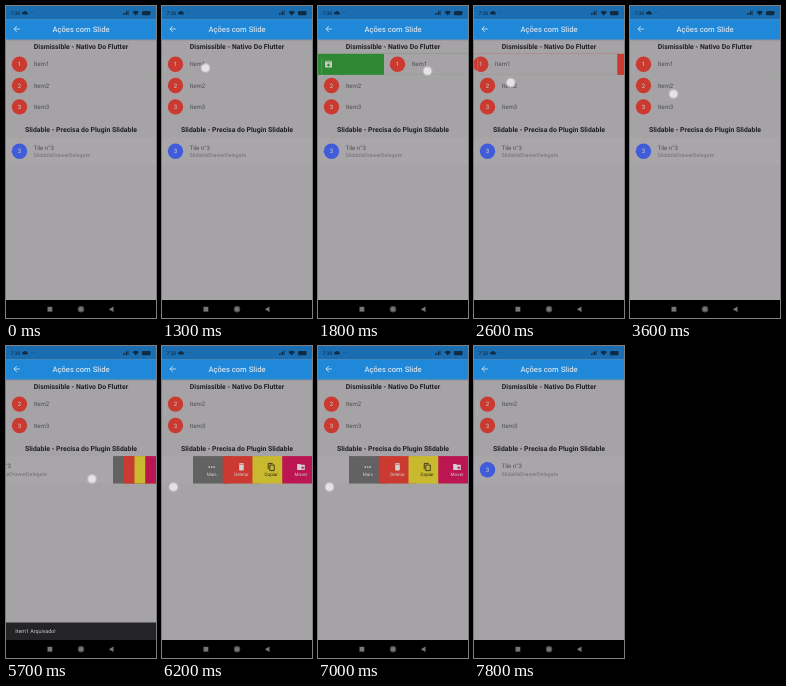
An HTML page for the animation above (8000 ms loop, 150 px wide and 312 px high).

```html
<!DOCTYPE html>
<html lang="pt">
<head>
<meta charset="utf-8">
<style>
  html, body { margin: 0; width: 100%; height: 100%; overflow: hidden; background: #a5a3a5; }
  svg { display: block; width: 100vw; height: 100vh; }
  text { font-family: Roboto, "Open Sans", sans-serif; text-rendering: geometricPrecision; }
  .mid { text-anchor: middle; }
  .heading { font-size: 6.9px; font-weight: 700; fill: #202022; }
  .title { font-size: 6.1px; fill: #505052; }
  .subtitle { font-size: 5.35px; fill: #727173; }
  .number { font-size: 6px; fill: #d5cdd0; }
  .label { font-size: 4.6px; }
</style>
</head>
<body>
<svg id="stage" viewBox="0 0 150 312"></svg>
<script>
const LOOP = 8000, STEP = 100, ROW = 21.4, ACTION = 37.5, SNACK = 17.5;
const RED = '#cb3a30', LIGHT = '#d2d0d2';

const text = (x, y, cls, s, extra = '') => `<text x="${x}" y="${y}" class="${cls}" ${extra}>${s}</text>`;
const rect = (x, y, w, h, fill, extra = '') =>
  `<rect x="${x}" y="${y}" width="${w}" height="${h}" fill="${fill}" ${extra}/>`;
const path = (d, fill, extra = '') => `<path d="${d}" fill="${fill}" ${extra}/>`;
const avatar = (y, color, n) =>
  `<circle cx="13.5" cy="${y}" r="7.7" fill="${color}"/>` + text(13.5, y + 2.1, 'number mid', n);
const item = (n, y) => avatar(y, RED, n) + text(27.5, y + 2.2, 'title', 'Item' + n);

// Icons are drawn around their own centre.
const icons = {
  more: c => [-2.5, 0, 2.5].map(x => `<circle cx="${x}" r=".85" fill="${c}"/>`).join(''),
  trash: c => path('M-2.7-3.4h1.4l.5-.6h1.6l.5.6h1.4v.8h-5.4zM-2.3-2.1h4.6v4.9q0 .8-.8.8h-3q-.8 0-.8-.8z', c),
  copy: c => path('M-3 2.2v-5.8h4.4M-1.4-2h4.4v5.6h-4.4z', 'none', `stroke="${c}" stroke-width=".85"`),
  folder: c => path('M-3.8-3h3l.8.8h3.8v5.2h-7.6z', c) + path('M.2.2h1.3v-1.2l1.8 1.7-1.8 1.7v-1.2h-1.3z', '#bb1552'),
  archive: c => path('M-3.4-2.4l.8-1h5.2l.8 1v5.8h-6.8z', c) + path('M-2.4-2.4h4.8M0-.9v2M-1.4.6h2.8l-1.4 1.6z', '#2f8934', 'stroke="#2f8934" stroke-width=".7"')
};
const icon = (name, x, y, color = LIGHT) => `<g transform="translate(${x} ${y})">${icons[name](color)}</g>`;

const actions = [
  ['Mais', '#636263', 'more', LIGHT],
  ['Deletar', RED, 'trash', LIGHT],
  ['Copiar', '#c9b92f', 'copy', '#2a2818'],
  ['Mover', '#bb1552', 'folder', LIGHT]
].map(([label, color, name, ink]) => `<g class="action">${rect(0, 131.5, ACTION, 27.4, color)}
  ${icon(name, ACTION / 2, 142.4, ink)}${text(ACTION / 2, 151.3, 'label mid', label, `fill="${ink}"`)}</g>`).join('');

const statusBar = rect(0, 0, 150, 13.5, '#1a6db0') +
  text(4.5, 8.8, '', '7:38', 'font-size="5" fill="#102c45"') +
  path('M17 8.5a1.4 1.4 0 0 1 .5-2.7 2 2 0 0 1 3.6.6 1.1 1.1 0 0 1 .1 2.1z', '#102c45') +
  text(25, 8.2, '', '···', 'font-size="5" fill="#102c45"') +
  path('M117 9h1v-1.5h-1zM118.5 9h1v-2.5h-1zM120 9h1v-3.5h-1zM121.5 9h1v-4.5h-1zM126.5 6q3.2-2.5 6.4 0l-3.2 3.4z', '#102c45') +
  rect(136, 5, 8.5, 4.2, '#102c45', 'rx="1"');

const appBar = rect(0, 13.5, 150, 20, '#2088d9') + rect(0, 33.5, 150, 1, '#000', 'opacity=".13"') +
  path('M13.8 23H8M10.8 20.1L7.9 23l2.9 2.9', 'none', 'stroke="#cfdfec" stroke-width=".9"') +
  text(75, 25.8, 'mid', 'Ações com Slide', 'font-size="7.64" font-weight="500" fill="#cfdfec"');

const navBar = rect(0, 294, 150, 18, '#000') + rect(41.5, 300.8, 4.8, 4.8, '#77777a') +
  '<circle cx="75" cy="303.2" r="2.9" fill="#77777a" stroke="#77777a" stroke-width=".6"/>' +
  '<circle cx="75" cy="303.2" r="2.6" fill="none" stroke="#222" stroke-width=".5"/>' +
  path('M107.5 300.4v5.6l-4.6-2.8z', '#77777a');

const stage = document.getElementById('stage');
stage.innerHTML = `
  ${rect(0, 0, 150, 312, '#a5a3a5')}
  ${text(75, 42.6, 'heading mid', 'Dismissible - Nativo Do Flutter')}
  <clipPath id="rowClip"><rect id="rowBox" y="47.5" width="150" height="${ROW}"/></clipPath>
  <g clip-path="url(#rowClip)">
    <g id="archiveBg">${rect(0, 47.5, 150, ROW, '#2f8934')}${icon('archive', 10.5, 58.2)}</g>
    <g id="deleteBg">${rect(0, 47.5, 150, ROW, RED)}${icon('trash', 139.5, 58.2)}</g>
    <g id="firstItem">${rect(0, 47.5, 150, ROW, '#a5a3a5')}${item(1, 58.2)}</g>
  </g>
  <g id="below">
    ${item(2, 79.5)}${item(3, 100.9)}
    ${text(75, 126.2, 'heading mid', 'Slidable - Precisa do Plugin Slidable')}
    ${actions}
    <g id="tile">${rect(0, 131.5, 150, 27.4, '#a8a6a8')}${avatar(145.2, '#415cdb', 3)}
      ${text(27.5, 143.5, 'title', 'Tile n°3')}${text(27.5, 151.3, 'subtitle', 'SlidableDrawerDelegate')}</g>
  </g>
  ${rect(3.4, 52, .8, 18, '#c4c2c4', 'opacity=".35"')}
  <g id="snack">${rect(0, 0, 150, SNACK, '#242325')}
    ${text(9.2, 10.7, '', 'Item1 Arquivado!', 'id="snackText" font-size="5.35" fill="#cfcdcf"')}</g>
  ${statusBar}${appBar}${navBar}
  <g id="touch"><circle r="5" fill="#e4e2e4" opacity=".4"/><circle r="3.8" fill="#e4e2e4"/></g>`;

const $ = id => document.getElementById(id);
const move = (el, x, y) => el.setAttribute('transform', `translate(${x} ${y})`);
const show = (el, on) => el.setAttribute('visibility', on ? 'visible' : 'hidden');
const actionEls = [...stage.querySelectorAll('.action')];

// Smooth interpolation through [time, value] keys.
function track(t, ...keys) {
  if (t <= keys[0][0]) return keys[0][1];
  for (let i = 1; i < keys.length; i++) {
    const [t0, a] = keys[i - 1], [t1, b] = keys[i];
    if (t <= t1) {
      const p = (t - t0) / (t1 - t0);
      return a + (b - a) * p * p * (3 - 2 * p);
    }
  }
  return keys[keys.length - 1][1];
}

function draw(t) {
  const swipe = track(t, [1300, 0], [1800, 66], [2100, 64], [2500, 0], [2850, -34], [3200, -31],
    [3600, 0], [3950, 75], [4150, 150]);
  const collapse = track(t, [4150, 0], [4450, ROW]);
  const open = track(t, [5300, 0], [5700, 43], [6150, 119], [6600, 121], [6800, 121], [7000, 119], [7550, 12], [7800, 0]);
  const snack = track(t, [4400, 0], [4500, 7.5], [4700, SNACK], [5800, SNACK], [6100, 0]);

  move($('firstItem'), swipe, 0);
  show($('archiveBg'), swipe > 0);
  show($('deleteBg'), swipe < 0);
  $('rowBox').setAttribute('height', ROW - collapse);
  move($('below'), 0, -collapse);

  move($('tile'), -open, 0);
  actionEls.forEach((el, i) => {
    move(el, 150 - open + i * open / 4, 0);
    show(el, open > 0);
  });

  move($('snack'), 0, 294 - snack);
  $('snackText').setAttribute('opacity', Math.max(0, snack / SNACK * 2 - 1));

  const first = t >= 1300 && t < 4000, second = t >= 5300 && t < 7600;
  show($('touch'), first || second);
  if (first) move($('touch'), 43.5 + swipe, track(t, [1300, 62], [1800, 65], [2800, 78], [3600, 88], [3900, 92]));
  if (second) move($('touch'), 129 - open + (open > 100 ? 1.5 : 0), track(t, [5300, 129], [5700, 133], [6200, 141], [7000, 141], [7600, 133]));
}

function tick(now) {
  draw(Math.floor(now % LOOP / STEP) * STEP);
  requestAnimationFrame(tick);
}
draw(0);
requestAnimationFrame(tick);
</script>
</body>
</html>
```
